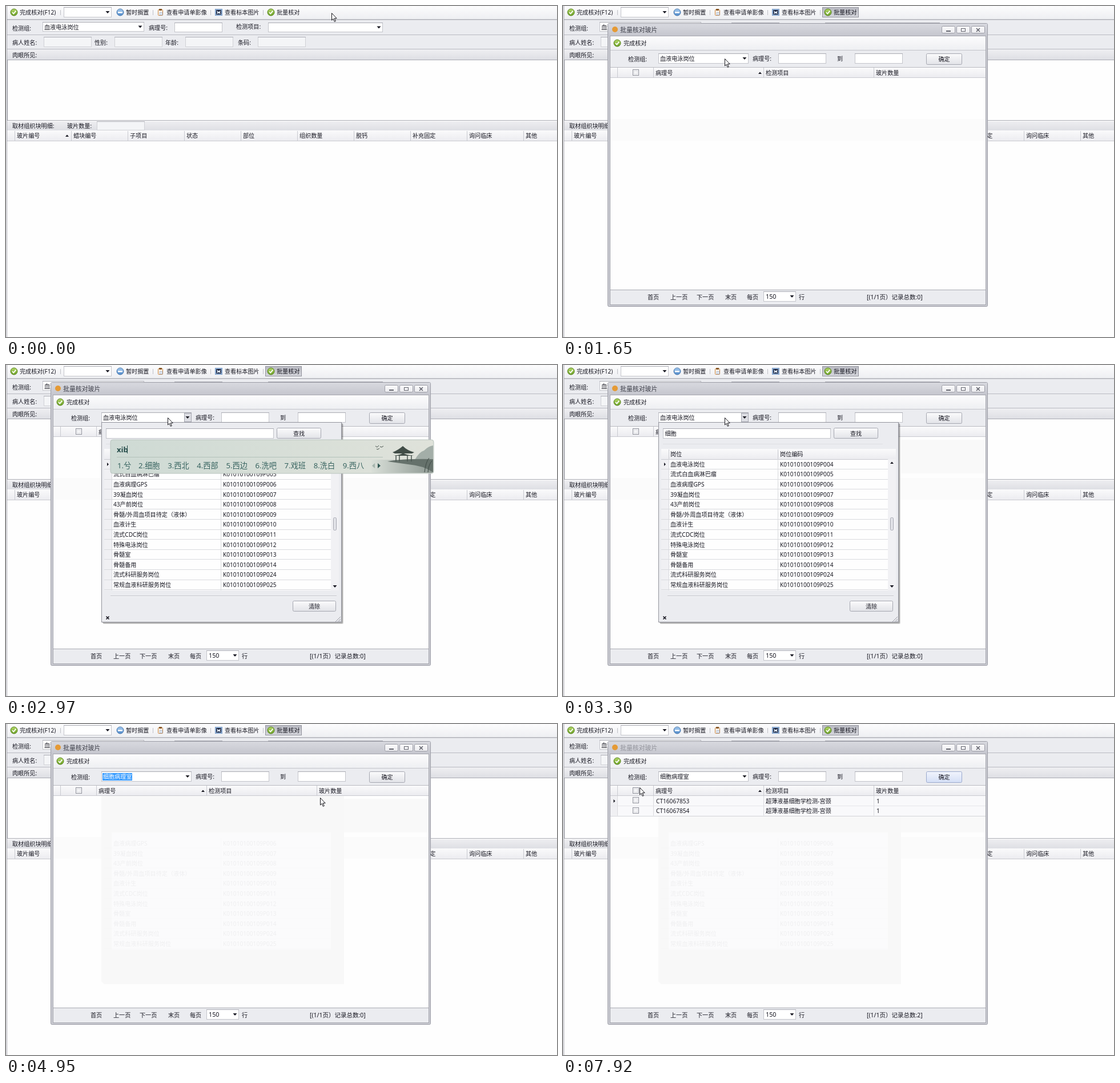
Recreate the animation shown at these times as an HTML page. Size 965 by 580 pixels, loop 8 s.

```html
<!DOCTYPE html>
<html lang="zh-CN">
<head>
<meta charset="utf-8">
<style>
html, body { margin: 0; width: 100%; height: 100%; overflow: hidden; background: #fefefe; }
svg { display: block; width: 965px; height: 580px; }
text { font-family: 'Noto Sans', 'Noto Sans CJK SC', 'Noto Sans CJK', sans-serif; white-space: pre; }
</style>
</head>
<body>
<script>
const LOOP = 8000, INK = '#181822', EDGE = '#b9bac1', PANEL = '#ebecf0';
const scenes = [];
let parent = document.body;

function add(tag, attrs = {}, content) {
  const node = document.createElementNS('http://www.w3.org/2000/svg', tag);
  for (const key in attrs) node.setAttribute(key, attrs[key]);
  if (content !== undefined) node.textContent = content;
  return parent.appendChild(node);
}
function inside(node, build) {
  const outer = parent;
  parent = node;
  build();
  parent = outer;
  return node;
}
// Everything drawn by build is visible from one time up to another.
const during = (from, to, build) => scenes.push({ from, to, node: inside(add('g'), build) });

const fillBox = (x, y, width, height, fill, extra) => add('rect', { x, y, width, height, fill, ...extra });
const frame = (x, y, w, h, fill, stroke = EDGE, rx = 0) =>
  fillBox(x + .5, y + .5, w - 1, h - 1, fill, { stroke, rx });
const path = (d, fill, stroke = 'none', extra) => add('path', { d, fill, stroke, ...extra });
const hline = (x1, x2, y, color = EDGE) => fillBox(x1, y, x2 - x1, 1, color);
const vline = (x, y1, y2, color = EDGE) => fillBox(x, y1, 1, y2 - y1, color);
const label = (x, y, content, size = 10.15, fill = INK, extra) =>
  add('text', { x, y: y + size * .37, 'font-size': size, fill, ...extra }, content);

function gradient(id, from, to, across) {
  inside(add('linearGradient', { id, x2: across ? 1 : 0, y2: across ? 0 : 1 }), () => {
    add('stop', { 'stop-color': from });
    add('stop', { offset: 1, 'stop-color': to });
  });
}

const downArrow = (x, y) => path(`M${x - 3.5} ${y - 2}h7l-3.5 4z`, INK);
const upArrow = (x, y) => path(`M${x - 3} ${y + 2}h6l-3-3.5z`, INK);
const rowMarker = (x, y) => path(`M${x - 1.5} ${y - 3}v6l3-3z`, INK);

function field(x, y, w, h, fill = '#fff', edge = '#c4c5cb') {
  frame(x, y, w, h, fill, edge);
  hline(x, x + w, y, '#a9aab2');
}
const disabledField = (x, y, w, h) => field(x, y, w, h, '#f4f5f7', '#d0d1d6');
function combo(x, y, w, h, value = '') {
  field(x, y, w, h);
  downArrow(x + w - 7, y + h / 2);
  label(x + 3, y + h / 2 + .5, value);
}
function button(x, y, w, h, content, fill = 'url(#button)', edge = '#a5a7b0') {
  frame(x, y, w, h, fill, edge, 2);
  label(x + w / 2, y + h / 2 + .5, content, 10.15, INK, { 'text-anchor': 'middle' });
}
function checkIcon(cx, cy) {
  add('circle', { cx, cy, r: 6, fill: 'url(#green)', stroke: '#56821d' });
  path(`M${cx - 3} ${cy}l2.3 2.6 4-5`, 'none', '#fff', { 'stroke-width': 1.8 });
}
function batchCheck() {
  checkIcon(464, 11);
  label(474, 11, '批量核对');
}
function checkbox(x, y) {
  frame(x, y, 11, 11, '#fdfdfe', '#8d8f99');
  frame(x + 2, y + 2, 7, 7, '#f4f4f6', '#dcdde2');
}

function mainWindow() {
  fillBox(0, 0, 965, 580, '#fefefe');
  fillBox(2, 0, 963, 23, 'url(#bar)');
  fillBox(2, 23, 963, 72, PANEL);
  hline(2, 965, 23, '#b0b1b8');
  hline(2, 965, 24, '#cfd0d5');
  hline(2, 965, 50);
  hline(2, 965, 75);
  fillBox(2, 77, 963, 17, 'url(#group)');
  frame(2, 94, 966, 107, '#fefefe', '#a9aab2');
  fillBox(2, 202, 963, 16, 'url(#group)');
  fillBox(2, 218, 963, 18, 'url(#head)');
  hline(2, 965, 236, '#c9cad0');
  vline(1, 0, 580, '#a2a3ab');

  checkIcon(14, 11);
  label(24, 11, '完成核对(F12)');
  combo(101, 2, 84, 18);
  add('circle', { cx: 200, cy: 11, r: 6, fill: 'url(#blue)', stroke: '#4978ae' });
  fillBox(196, 10, 8, 2.5, '#fff');
  label(210, 11, '暂时搁置');
  frame(266, 6, 9, 11, '#fff8ed', '#c9813a', 1);
  fillBox(268, 5, 5, 3, '#8a5a2a');
  path('M269 11h5v5h-5z', '#dfe8f5', '#8d9ab0', { 'stroke-width': .6 });
  label(281, 11, '查看申请单影像');
  frame(366, 5, 13, 12, '#9fc0e6', '#7a9bc5');
  fillBox(368, 7, 9, 8, '#17203a');
  path('M369 8l3 2 1 0 3-2-1 3 1 3-3-1-1 0-3 1 1-3z', '#d8e8fa');
  label(383, 11, '查看标本图片');
  batchCheck();
  [95, 257, 358, 450].forEach(x => vline(x, 7, 16, '#bfc0c6'));

  label(11, 39, '检测组:');
  combo(64, 28, 178, 17, '血液电泳岗位');
  label(250, 38.5, '病理号:');
  field(295, 29, 84, 17);
  label(403, 36, '检测项目:');
  combo(459, 29, 201, 17);
  [[11, '病人姓名:', 66], [155, '性别:', 190], [279, '年龄:', 314], [406, '条码:', 441]].forEach(([x, name, at]) => {
    label(x, 64, name);
    disabledField(at, 54, 84, 18);
  });
  label(11, 86, '肉眼所见:');
  label(11, 210.5, '取材组织块明细:');
  label(107, 210.5, '玻片数量:');
  disabledField(159, 202, 84, 16);
  ['玻片编号', '蜡块编号', '子项目', '状态', '部位', '组织数量', '脱钙', '补充固定', '询问临床', '其他'].forEach((name, i) => {
    vline(15 + i * 99, 219, 236, '#c9cad0');
    label(19 + i * 99, 227.5, name);
  });
  upArrow(107, 227);
}

function windowButtons(x, y) {
  for (let i = 0; i < 3; i++) frame(x + i * 26, y, 24, 13, 'url(#head)', '#9c9da6', 2);
  fillBox(x + 8, y + 8, 8, 2, '#62636c');
  frame(x + 34, y + 4, 8, 6, 'none', '#62636c');
  path(`M${x + 61} ${y + 4}l6 6m0-6l-6 6`, 'none', '#62636c', { 'stroke-width': 1.6 });
}

function openingWindow() {
  inside(add('g', { opacity: .72 }), () => {
    frame(84, 34, 655, 489, '#cdced6', '#a9aab3', 2);
    fillBox(88, 56, 647, 463, '#fff');
    fillBox(170, 103, 157, 5, '#ececef');
    fillBox(90, 496, 54, 21, '#ececef');
    frame(358, 496, 70, 21, '#fff', '#ececef');
    hline(322, 410, 515, '#dcdde1');
    windowButtons(659, 39);
    add('circle', { cx: 96, cy: 46, r: 4, fill: '#e9b56c' });
    label(105, 46, '批量核对玻片', 10.8, '#4c4d58', { 'font-weight': 'bold' });
  });
}

function dialog() {
  frame(454, 2, 64, 18, 'url(#pressed)', '#92939c');
  batchCheck();
  frame(78, 30, 666, 497, '#c9cad1', '#9b9ca5', 2);
  fillBox(79, 31, 664, 21, 'url(#title)');
  add('circle', { cx: 91, cy: 41, r: 5, fill: '#e59a35' });
  windowButtons(663, 35);
  frame(82, 52, 659, 472, '#fefefe', '#a4a5ad');
  fillBox(83, 53, 657, 24, 'url(#bar)');
  hline(83, 740, 77, '#c3c4ca');
  fillBox(83, 78, 657, 29, PANEL);
  hline(83, 740, 107);
  fillBox(83, 108, 657, 17, 'url(#head)');
  hline(83, 740, 125, '#c9cad0');
  checkIcon(95, 65);
  label(106, 65.5, '完成核对');
  label(114, 93.5, '检测组:');
  combo(167, 83, 158, 18);
  label(332, 92.5, '病理号:');
  field(377, 83, 84, 18);
  label(480, 92.5, '到');
  field(511, 83, 84, 18);
  [[96, ''], [159, '病理号'], [352, '检测项目'], [545, '玻片数量']].forEach(([x, name]) => {
    vline(x - 1, 108, 125, '#c9cad0');
    label(x + 3, 117, name);
  });
  checkbox(122, 111);
  upArrow(345, 117);
  fillBox(83, 198, 657, 38, '#fbfbfb');
  hline(83, 740, 497, '#a9aab2');
  fillBox(83, 498, 657, 25, PANEL);
  [[148, '首页'], [188, '上一页'], [234, '下一页'], [284, '末页'], [322, '每页'], [413, '行']]
    .forEach(([x, name]) => label(x, 510, name));
  field(351, 500, 57, 18);
  label(355, 509.5, '150', 10.8);
  downArrow(401, 509);
}

function status(titleColor, count) {
  label(100, 42, '批量核对玻片', 10.9, titleColor);
  label(532, 510.5, `[(1/1页）记录总数:${count}]`, 10.5);
}

const posts = ['血液电泳岗位', '流式白血病淋巴瘤', '血液病理GPS', '39凝血岗位', '43产前岗位',
  '骨髓/外周血项目待定（液体）', '血液计生', '流式CDC岗位', '特殊电泳岗位', '骨髓室', '骨髓备用',
  '流式科研服务岗位', '常规血液科研服务岗位'];
const postCode = i => 'K01010100109P' + String(i < 11 ? i + 4 : i + 13).padStart(3, '0');

function postRows(first = 0) {
  posts.forEach((name, i) => {
    if (i < first) return;
    const y = 174 + i * 17.6;
    hline(172, 569, Math.round(y + 8), '#d9dade');
    label(188, y, name);
    label(380, y, postCode(i));
  });
  vline(376, 165 + first * 17.6, 395, '#d9dade');
}
function postGhost() {
  fillBox(185, 190, 384, 205, '#fdfdfe', { opacity: .7 });
  inside(add('g', { opacity: .05 }), () => postRows(2));
}
function gridHead(split) {
  fillBox(172, 147, 411, 18, 'url(#head)');
  hline(172, 583, 165, '#c9cad0');
  vline(185, 148, 165, '#c9cad0');
  vline(split, 148, 165, '#c9cad0');
  label(188, 156.5, '岗位');
  label(split + 4, 156.5, '岗位编码');
}

function fullList() {
  fillBox(172, 147, 411, 248, '#fefefe');
  fillBox(172, 165, 13, 230, '#f0f0f3');
  gridHead(376);
  postRows();
  vline(185, 165, 395, '#d9dade');
  rowMarker(178.5, 174);
  fillBox(569, 165, 14, 230, '#f1f1f4');
  frame(573, 267, 6, 23, '#e3e4e9', '#a5a7b0', 2);
  upArrow(576, 171);
  downArrow(576, 388);
}

function foundList() {
  fillBox(172, 147, 411, 248, '#f5f5f7');
  gridHead(383);
  postGhost();
  fillBox(172, 166, 411, 34, '#fafafb');
  fillBox(189, 168, 22, 12, '#ffd91a');
  fillBox(244, 185.5, 22, 12, '#ffd91a');
  label(189, 174, '细胞病理室', 10.85);
  label(189, 191.5, '多重组学与细胞生物学科研岗位', 10.85);
  label(387, 174, 'K01010100112P001');
  label(387, 191.5, 'K01010100117P006');
  [182, 200].forEach(y => hline(172, 583, y, '#d5d6da'));
  [185, 383].forEach(x => vline(x, 166, 200, '#d5d6da'));
}

function dropdown() {
  frame(312, 84, 13, 16, '#dcdde3', '#a5a7b0');
  downArrow(318, 92);
  fillBox(170, 103, 421, 351, '#000', { opacity: .12, rx: 2 });
  fillBox(169, 102, 421, 351, '#000', { opacity: .22, rx: 2 });
  frame(167, 100, 421, 351, PANEL, '#92939c');
  field(175, 111, 294, 18);
  button(474, 110, 78, 19, '查找');
  hline(175, 560, 138, '#dfe0e4');
  hline(183, 579, 404, '#c2c3c9');
  hline(183, 579, 405, '#f8f8fa');
  button(502, 413, 76, 19, '清除');
  path('M175.5 440.5l5 5m0-5l-5 5', 'none', INK, { 'stroke-width': 1.7 });
  path('M577 450l9-9m-5 9l5-5m-2 5l2-2', 'none', '#9a9ba3');

  during(1980, 3960, fullList);
  during(3960, 4950, foundList);
  during(4620, 4950, () => rowMarker(178.5, 174));
  during(1980, 2310, () => vline(179, 114, 126, INK));
  during(3300, 4950, () => label(178.5, 120.5, '细胞'));
}

function inputMethod() {
  fillBox(183, 131, 566, 59, 'url(#mist)', { rx: 4, stroke: '#b9c4be' });
  fillBox(640, 166, 108, 23, 'url(#water)', { rx: 3 });
  hline(194, 660, 161, '#b3c2ba');
  path('M716 166q8-14 16-16q8-8 16-9v26z', '#a3aea8');
  path('M668 169q26-5 80-4v23q-18-12-44-14z', '#65716b');
  path('M677 153q10-4 18-11q8 8 20 11l-4 2h-30zM679 159q14-2 16-5q6 4 20 5z', '#414d47');
  path('M683 158v11m6-11v11m14-11v11m7-11v11', 'none', '#4a5650', { 'stroke-width': 1.5 });
  path('M733 188q2-18 8-25m-2 25q1-14 7-20', 'none', '#3f4a45');
  path('M647 142l3 2 3-3m2 2l3 1 3-2m-12 5l2 1 3-2', 'none', '#46514c');
  label(194, 148, 'xib', 13, '#234a48', { 'font-weight': 'bold' });
  vline(212, 141, 155, '#234a48');
  ['兮', '细胞', '西北', '西部', '西边', '洗吧', '戏班', '洗白', '西八'].forEach((word, i) =>
    label(i ? 181 + i * 51.1 : 195, 176.5, `${i + 1}.${word}`, 13.2, '#386460'));
  path('M646 172v9l-5-4.5z', '#a4b4ac');
  path('M651 172v9l5-4.5z', '#2f5752');
}

function results() {
  ['CT16067853', 'CT16067854'].forEach((code, i) => {
    const y = 135 + i * 17.5;
    fillBox(83, y - 9, 657, 17, '#f9f9fb');
    fillBox(83, y - 9, 13, 17, '#f0f0f3');
    hline(83, 740, Math.round(y + 8), '#d3d4d9');
    [95, 158, 351, 544].forEach(x => vline(x, y - 9, y + 8, '#d9dade'));
    checkbox(122, Math.round(y - 7));
    label(163, y, code);
    label(355, y, '超薄液基细胞学检测-宫颈');
    label(549, y, '1');
  });
  rowMarker(90, 135);
}

const cursorSteps = [[0, 570, 12], [330, 514, 13], [990, 499, 56], [1320, 447, 102], [1650, 283, 92],
  [3960, 292, 103], [4290, 371, 162], [4620, 445, 174], [4950, 550, 129], [5280, 635, 95], [5610, 658, 90],
  [5940, 834, 92], [6270, 954, 29], [6600, -40, 0], [7590, 43, 141], [7920, 134, 111]];
let cursor;

inside(add('svg', { viewBox: '0 0 965 580' }), () => {
  inside(add('defs'), () => {
    gradient('bar', '#fcfcfd', '#eeeff2');
    gradient('group', '#eeeef1', '#dedfe4');
    gradient('head', '#fafafb', '#ececf0');
    gradient('title', '#d8d9df', '#c5c6ce');
    gradient('pressed', '#b9bac2', '#d6d7dd');
    gradient('button', '#fbfbfc', '#e2e3e8');
    gradient('buttonBlue', '#f1f4fd', '#d4dff6');
    gradient('green', '#b5d969', '#6a9f25');
    gradient('blue', '#a9cdf0', '#4d88c8');
    gradient('mist', '#cedad4', '#dfe2da', true);
    gradient('water', '#d9dfd8', '#8d9892', true);
  });
  mainWindow();
  during(660, 990, openingWindow);
  during(990, LOOP, dialog);
  during(990, 7590, () => status('#3f404b', 0));
  during(990, 1320, () => vline(380, 86, 98, INK));
  during(990, 4950, () => label(170, 92.5, '血液电泳岗位'));
  during(990, 5610, () => button(636, 83, 63, 20, '确定'));
  during(3300, LOOP, () => fillBox(592, 131, 148, 59, '#f9f9f9'));
  during(4950, LOOP, () => {
    path('M167 126H592V456H172L167 451Z', '#f8f8f8');
    postGhost();
    label(170, 92.5, '细胞病理室');
  });
  during(4950, 5610, () => {
    fillBox(169, 86, 52, 13, '#3399ff');
    label(170, 92.5, '细胞病理室', 10.15, '#fff');
  });
  during(5610, 7590, () => {
    button(636, 83, 63, 20, '确定', 'url(#buttonBlue)', '#5c6a92');
    frame(638, 85, 59, 16, 'none', '#93a3cc');
  });
  during(7590, LOOP, () => {
    button(636, 83, 63, 20, '确定', 'url(#buttonBlue)', '#9aa9cd');
    status('#93949c', 2);
    results();
  });
  during(1980, 4950, dropdown);
  during(2970, 3300, inputMethod);
  cursor = path('M.5 .5V13L3.3 10.4L5.3 15.4L7.3 14.5L5.2 9.7H9.2Z', '#fff', '#16161c');
});

const start = performance.now();
function render() {
  const time = (performance.now() - start) % LOOP;
  for (const { node, from, to } of scenes)
    node.setAttribute('display', time >= from && time < to ? 'inline' : 'none');
  const [, x, y] = cursorSteps.findLast(([from]) => from <= time);
  cursor.setAttribute('transform', `translate(${x} ${y})`);
  requestAnimationFrame(render);
}
render();
</script>
</body>
</html>
```
